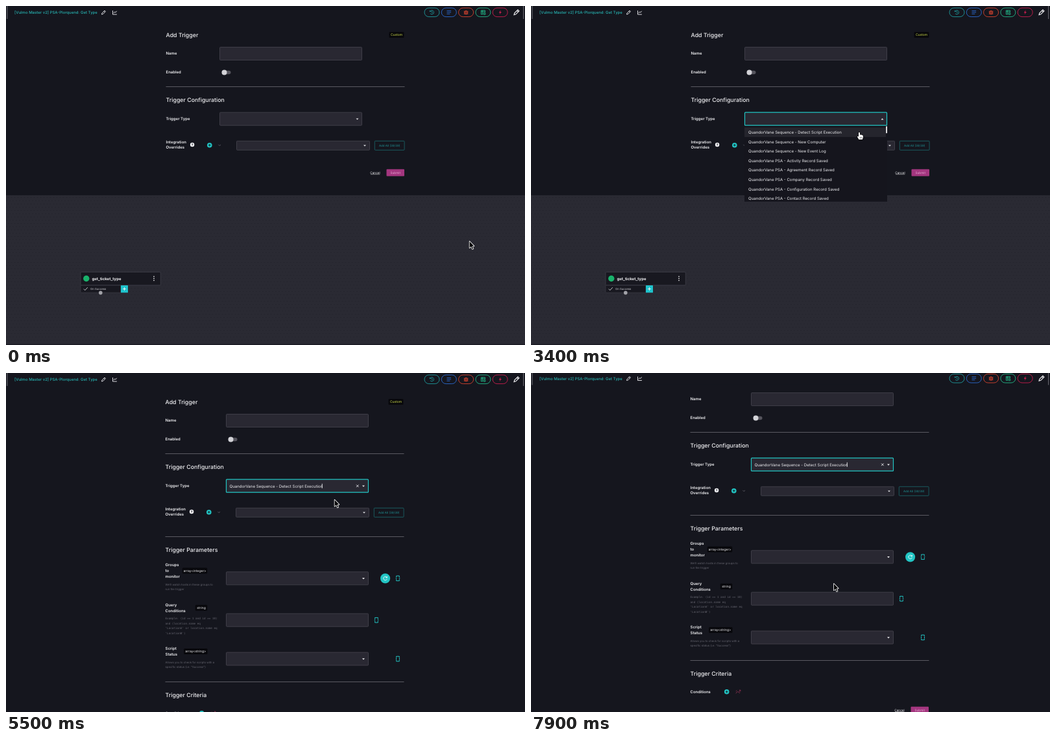
Animation, 800 px wide and 523 px high, one loop 8000 ms. Source, as an HTML page with a canvas:

```html
<!DOCTYPE html>
<html lang="en">
<head>
<meta charset="utf-8">
<title>Add Trigger</title>
<style>
html, body { margin: 0; width: 100%; height: 100%; overflow: hidden; background: #15161e; }
canvas { display: block; width: 800px; height: 523px; }
</style>
</head>
<body>
<canvas id="stage"></canvas>
<script>
const LOOP = 8000, STEP = 100, W = 800, H = 523;
const OPENED = 1500, PICKED = 5500;
const BG = '#15161e', WHITE = '#f0f0f3', TEAL = '#22c5c4', FIELD = '#292832', EDGE = '#474650', DIM = '#666670';
const SANS = 'Inter, sans-serif', MONO = '"DejaVu Sans Mono", monospace';
const PRODUCT = 'QuandorVane';
const CHOICE = PRODUCT + ' Sequence - Detect Script Execution';
const OPTIONS = [
  CHOICE,
  PRODUCT + ' Sequence - New Computer',
  PRODUCT + ' Sequence - New Event Log',
  ...['Activity', 'Agreement', 'Company', 'Configuration', 'Contact']
    .map(kind => `${PRODUCT} PSA - ${kind} Record Saved`)
];

const canvas = document.getElementById('stage');
const ctx = canvas.getContext('2d');
const ratio = window.devicePixelRatio || 1;
canvas.width = W * ratio;
canvas.height = H * ratio;

const clamp = v => Math.max(0, Math.min(1, v));
const ease = v => v * v * (3 - 2 * v);
const ramp = (t, from, to) => ease(clamp((t - from) / (to - from)));

// Text is placed by its left (or centre) and the middle of its capitals.
function text(str, x, y, size, { color = WHITE, weight = 400, font = SANS, align = 'left' } = {}) {
  ctx.font = `${weight} ${size}px ${font}`;
  ctx.textAlign = align;
  ctx.fillStyle = color;
  ctx.fillText(str, x, y + size * 0.36);
}

function box(x, y, w, h, { fill, stroke, line = 0.8, r = 1 } = {}) {
  ctx.beginPath();
  ctx.roundRect(x, y, w, h, r);
  if (fill) { ctx.fillStyle = fill; ctx.fill(); }
  if (stroke) { ctx.strokeStyle = stroke; ctx.lineWidth = line; ctx.stroke(); }
}

function disc(x, y, r, color) {
  ctx.beginPath();
  ctx.arc(x, y, r, 0, Math.PI * 2);
  ctx.fillStyle = color;
  ctx.fill();
}

function stroke(d, x, y, color, width = 1) {
  ctx.save();
  ctx.translate(x, y);
  ctx.strokeStyle = color;
  ctx.lineWidth = width;
  ctx.stroke(new Path2D(d));
  ctx.restore();
}

function shape(d, x, y, fill, edge, width = 1) {
  ctx.save();
  ctx.translate(x, y);
  const path = new Path2D(d);
  ctx.lineJoin = 'round';
  if (edge) { ctx.strokeStyle = edge; ctx.lineWidth = width * 2; ctx.stroke(path); }
  ctx.fillStyle = fill;
  ctx.fill(path);
  ctx.restore();
}

const heading = (s, x, y) => text(s, x, y, 8.8, { weight: 500 });
const label = (s, x, y) => text(s, x, y, 6, { weight: 600 });
const caretDown = (x, y) => shape('M-2-1H2L0 1.2Z', x, y, WHITE);
const caretUp = (x, y) => shape('M-2 1H2L0-1.2Z', x, y, WHITE);

function divider(x, y) {
  ctx.fillStyle = '#62626a';
  ctx.fillRect(x, y, 368, 0.9);
}

function chip(s, x, y, w, color = WHITE) {
  box(x - w / 2, y - 4.5, w, 9, { fill: '#08080c', r: 1.5 });
  text(s, x, y, 5, { align: 'center', color });
}

function plusDisc(x, y) {
  disc(x, y, 3.8, TEAL);
  stroke('M-1.9 0H1.9M0-1.9V1.9', x, y, BG, 0.9);
}

function field(x, y, edge = EDGE) {
  box(x, y, 219, 20, { fill: FIELD, stroke: edge, line: edge === EDGE ? 0.8 : 1.2 });
}

function braces(x, y) {
  stroke('M-2.3-1.5V-3.8H2.3V-1.5M-2.3 1.5V3.8H2.3V1.5M-2-1L-3 0L-2 1M2-1L3 0L2 1', x, y, TEAL, 1);
}

function pencil(x, y, k) {
  ctx.save();
  ctx.translate(x, y);
  ctx.scale(k, k);
  stroke('M-3 3L-2.4 .9L1.5-3L3-1.5L-.9 2.4ZM.4-1.9L1.9-.4', 0, 0, WHITE, 0.9);
  ctx.restore();
}

function header() {
  ctx.fillStyle = BG;
  ctx.fillRect(0, -2, W, 21);
  ctx.fillStyle = '#85858d';
  ctx.fillRect(1.5, 0, 0.8, 20);
  ctx.fillRect(797.3, 0, 0.8, 20);
  text('[Vulmo Master v2] PSA-Plorquend: Get Type', 13, 10, 6, { color: '#27b5b3', weight: 500 });
  pencil(150.5, 10, 1);
  stroke('M-3-3V3H3.4M-1.6 1L0-1L1.3 0L3.2-2.2', 167.5, 10, WHITE, 0.9);
  pencil(787, 9.7, 1.3);
  const icons = [
    ['#1f9c9f', 'M-2.6-1.5A3 3 0 1 1-2.4 1.8M-3.2-3V-1.2H-1.4M0-1.6V.2L1.4 1'],
    ['#2c6bd2', 'M-3.3-2.4H3.3M-3.3 0H3.3M-3.3 2.4H1.5'],
    ['#d9442f', 'M-1.8-1.5Q0-4 1.8-1.5V2Q0 4.2-1.8 2ZM-3.4-1.5H3.4M-3.4.5H3.4M-3.2 2.4H3.2'],
    ['#23b98a', 'M-3-3H3V0M-3-3V3H-.5M-3-1H3M-.8-3V3M.8 1H3.4V3.4H.8Z'],
    ['#cb1d4f', 'M1-3.8L-2 .6H0L-1 3.8L2.2-.8H.2Z']
  ];
  icons.forEach(([color, d], i) => {
    const x = 656.5 + i * 26.3;
    box(x - 11.5, 3, 23, 13.6, { stroke: color, line: 0.9, r: 6.8 });
    if (i === 4) shape(d, x, 9.8, color);
    else stroke(d, x, 9.8, color, 0.9);
  });
}

function actions(x, y) {
  text('Cancel', x + 322.5, y, 4.7, { align: 'center' });
  ctx.fillStyle = WHITE;
  ctx.fillRect(x + 315.5, y + 2.4, 14.3, 0.5);
  box(x + 340, y - 5.4, 27.5, 10.8, { fill: '#a4367f' });
  text('Submit', x + 353.7, y, 4.7, { align: 'center', color: '#e5a9d2' });
}

// The part of the form that both layouts share.
function form(x, fx) {
  heading('Add Trigger', x, 44.5);
  chip('Custom', x + 355.5, 44.6, 23, '#cddc4a');
  label('Name', x, 73);
  field(fx, 63.5);
  label('Enabled', x, 102);
  box(fx + 3.5, 99.8, 13.5, 5.4, { fill: '#55545d', r: 2.7 });
  disc(fx + 7, 102.5, 4, '#d3d3d8');
  divider(x, 124);
  heading('Trigger Configuration', x, 145);
  label('Trigger Type', x, 173.5);
  label('Integration', x, 209.7);
  label('Overrides', x, 218.3);
  disc(x + 40.6, 214, 3.2, WHITE);
  text('?', x + 40.6, 214, 5, { color: BG, weight: 700, align: 'center' });
  plusDisc(x + 67.3, 214.7);
  stroke('M-1.8-.8L0 1L1.8-.8', x + 82.7, 214.7, DIM, 0.8);
  box(x + 109, 208.3, 205, 14, { fill: FIELD, stroke: EDGE });
  caretDown(x + 306.5, 215.4);
  box(x + 321.8, 208.3, 45.8, 14, { stroke: '#1c7779', line: 0.7 });
  text('Add All (39/39)', x + 344.7, 215.3, 4.5, { color: '#1f9496', align: 'center' });
}

function flowCanvas() {
  ctx.fillStyle = '#2a2a33';
  ctx.fillRect(0, 292, W, 231);
  ctx.fillStyle = '#25252e';
  for (let y = 295; y < 520; y += 5)
    for (let x = (y % 2) * 2.5; x < W; x += 5) ctx.fillRect(x, y, 2, 1);
  ctx.fillStyle = '#1b1b24';
  ctx.fillRect(0, 521.5, W, 2);

  box(115, 410.5, 123.3, 20.3, { fill: '#181820', stroke: '#41414b', r: 1.5 });
  disc(123.8, 420.5, 4.7, '#19b26b');
  text('get_ticket_type', 132.5, 420.4, 6, { weight: 700 });
  [-3, 0, 3].forEach(d => disc(228, 420.4 + d, 0.8, WHITE));
  box(115, 431, 62, 11.2, { fill: '#181820', stroke: '#41414b', line: 0.6 });
  stroke('M-3 0L-1 2L3-2.3', 122.8, 436.5, WHITE, 0.8);
  text('On Success', 130, 436.4, 4.3, { color: '#d0d0d6' });
  box(177, 431, 11, 11.2, { fill: '#1fc3cc', r: 0.5 });
  stroke('M-2.4 0H2.4M0-2.4V2.4', 182.5, 436.5, WHITE, 1);
  disc(145.8, 442.4, 2.8, '#a3a3a9');
}

function textCaret(x) {
  ctx.fillStyle = WHITE;
  ctx.fillRect(x, 170.8, 0.9, 7);
}

function emptyForm(t, pointer) {
  const x = 246.5, fx = 329.5, open = t >= OPENED;
  const hovered = t >= 1200 && !open;
  flowCanvas();
  form(x, fx);
  field(fx, 164.2, open ? TEAL : hovered ? WHITE : EDGE);
  if (pointer.y < 186 && pointer.x > 534 && pointer.x < 549) disc(541.5, 174.3, 5.5, '#3c3b45');
  (open ? caretUp : caretDown)(541.5, 174.4);
  actions(x, 257.2);
  if (!open) return;
  if ((t - OPENED) % 1000 < 500) textCaret(334.6);
  ctx.fillStyle = '#15151d';
  ctx.fillRect(329, 185.2, 220, 116.6);
  if (pointer.y > 187) {
    ctx.fillStyle = '#25252d';
    ctx.fillRect(329, 187.4, 218, 14.7);
  }
  ctx.save();
  ctx.beginPath();
  ctx.rect(329, 185, 220, 116.6);
  ctx.clip();
  OPTIONS.forEach((s, i) => text(s, 335, 194.7 + i * 14.64, 6.1));
  ctx.restore();
  ctx.fillStyle = '#f4f4f6';
  ctx.fillRect(547.2, 185.6, 1.8, 10.6);
}

function hints(lines, x, y, step, style) {
  lines.forEach((s, i) => text(s, x, y + i * step, 4.3, { color: DIM, ...style }));
}

function filledForm(t) {
  const x = 245.5, fx = 339.5;
  form(x, fx);
  field(fx, 164.2, TEAL);
  text(CHOICE, 344.5, 174.4, 6.1);
  if ((t - PICKED) % 1000 < 500) textCaret(486.8);
  stroke('M-1.8-1.8L1.8 1.8M-1.8 1.8L1.8-1.8', 541.8, 174.3, WHITE, 0.9);
  caretDown(551, 174.6);

  divider(x, 252);
  heading('Trigger Parameters', x, 273);
  ['Groups', 'to', 'monitor'].forEach((s, i) => label(s, x, 296.3 + i * 8.8));
  chip('array<integer>', 291, 305, 38.5);
  hints(["We'll watch hosts in these groups to", 'run the trigger'], x, 326, 7.4);
  field(fx, 306.8, t >= 6900 && t < 7500 ? WHITE : EDGE);
  caretDown(551, 317);
  disc(584.6, 316.8, 7.6, TEAL);
  stroke('M2.3-1.6A2.8 2.8 0 1 0 2.7 1M2.8-3V-1H.8', 584.6, 316.8, '#eafafa', 1);
  braces(604, 316.8);

  label('Query', x, 358);
  label('Conditions', x, 366.8);
  chip('string', 301, 362.2, 18.5);
  hints(['Example: (id == 1 and id == 10)', 'and (location.name eq',
    "'LocationA' or location.name eq", "'LocationB')"], x, 378.8, 7.4, { font: MONO });
  field(fx, 371.2);
  braces(571, 381.2);

  label('Script', x, 425);
  label('Status', x, 433.8);
  chip('array<string>', 292.3, 429.4, 36.5);
  hints(['Allows you to check for scripts with a', 'specific status (i.e. "Success")'], x, 446, 7.4);
  field(fx, 431);
  caretDown(551, 441.2);
  braces(604, 441);

  divider(x, 476);
  heading('Trigger Criteria', x, 497);
  label('Conditions', x, 524.7);
  plusDisc(301.7, 524.8);
  stroke('M-3.5 2.5L-1-.5L.6 1L3.5-2.5M1.6-2.6H3.6V-.6M-3.5-.8L-2-2.2M1.5 2.4L3 1', 319.3, 524.8, '#8c2f50', 0.9);
  actions(x, 553.2);
}

// Time, x and y of the pointer's hot spot.
const PATH = [
  [100, 714, 362], [600, 488, 240], [700, 488, 240], [1300, 544, 175.8],
  [2600, 544, 175.8], [3300, 506, 194.5], [6400, 506, 194.5],
  [6500, 500, 212], [6900, 467, 325], [7400, 467, 325], [7500, 466.3, 324]
];
const POINTERS = [
  [0, 'arrow'], [1200, 'hand'], [PICKED, 'arrow'], [6500, 'beam'],
  [6600, 'arrow'], [6900, 'beam'], [7500, 'arrow']
];

function pointerAt(t) {
  const kind = POINTERS.filter(p => p[0] <= t).pop()[1];
  const next = PATH.findIndex(p => p[0] > t);
  if (next <= 0) {
    const [, x, y] = next ? PATH[PATH.length - 1] : PATH[0];
    return { x, y, kind };
  }
  const a = PATH[next - 1], b = PATH[next], k = ramp(t, a[0], b[0]);
  return { x: a[1] + (b[1] - a[1]) * k, y: a[2] + (b[2] - a[2]) * k, kind };
}

function drawPointer({ x, y, kind }) {
  if (kind === 'arrow') {
    shape('M.6 1.2V11.2L3 9L4.8 13L6.2 12.4L4.4 8.4H7.4Z', x, y, '#050507', '#ffffff', 0.8);
  } else if (kind === 'hand') {
    shape('M-1 .9Q0-.4 1 .9V4.4Q2-.2+2.4 4.2 3.8 3.7 4 4.8 5.6 4.4 5.9 5.8V8.5L4.8 11.5H-.6L-3 7.6Q-3.4 5.9-1 7Z'
      .replace('Q2-.2+2.4 4.2', 'Q1.9 3.4 2.4 4.2'), x, y, '#ffffff', '#08080a', 0.7);
    stroke('M1.2 7.6V10M2.7 7.6V10M4.1 7.6V10', x, y, '#202024', 0.5);
  } else {
    const beam = 'M-2.6-5.6Q0-5.6 0-4V4Q0 5.6-2.6 5.6M2.6-5.6Q0-5.6 0-4M0 4Q0 5.6 2.6 5.6M-1.4 1.4H1.4';
    stroke(beam, x, y, '#ffffff', 2.4);
    stroke(beam, x, y, '#08080a', 0.9);
  }
}

function render(now) {
  const t = Math.floor((now % LOOP) / STEP) * STEP;
  const pointer = pointerAt(t);
  const settle = ramp(t, 7400, 7700);
  const scroll = 28 * ramp(t, 6900, 7200) + 3.5 * settle;

  ctx.setTransform(ratio, 0, 0, ratio, 0, 0);
  ctx.textRendering = 'geometricPrecision';
  ctx.fillStyle = BG;
  ctx.fillRect(0, 0, W, H);
  ctx.translate(0, -1.5 * settle);
  ctx.save();
  ctx.translate(0, -scroll);
  if (t < PICKED) emptyForm(t, pointer);
  else filledForm(t);
  ctx.restore();
  header();
  ctx.setTransform(ratio, 0, 0, ratio, 0, 0);
  drawPointer(pointer);
  requestAnimationFrame(frame);
}

let start;
function frame(now) {
  start ??= now;
  render(now - start);
}
requestAnimationFrame(frame);
</script>
</body>
</html>
```
